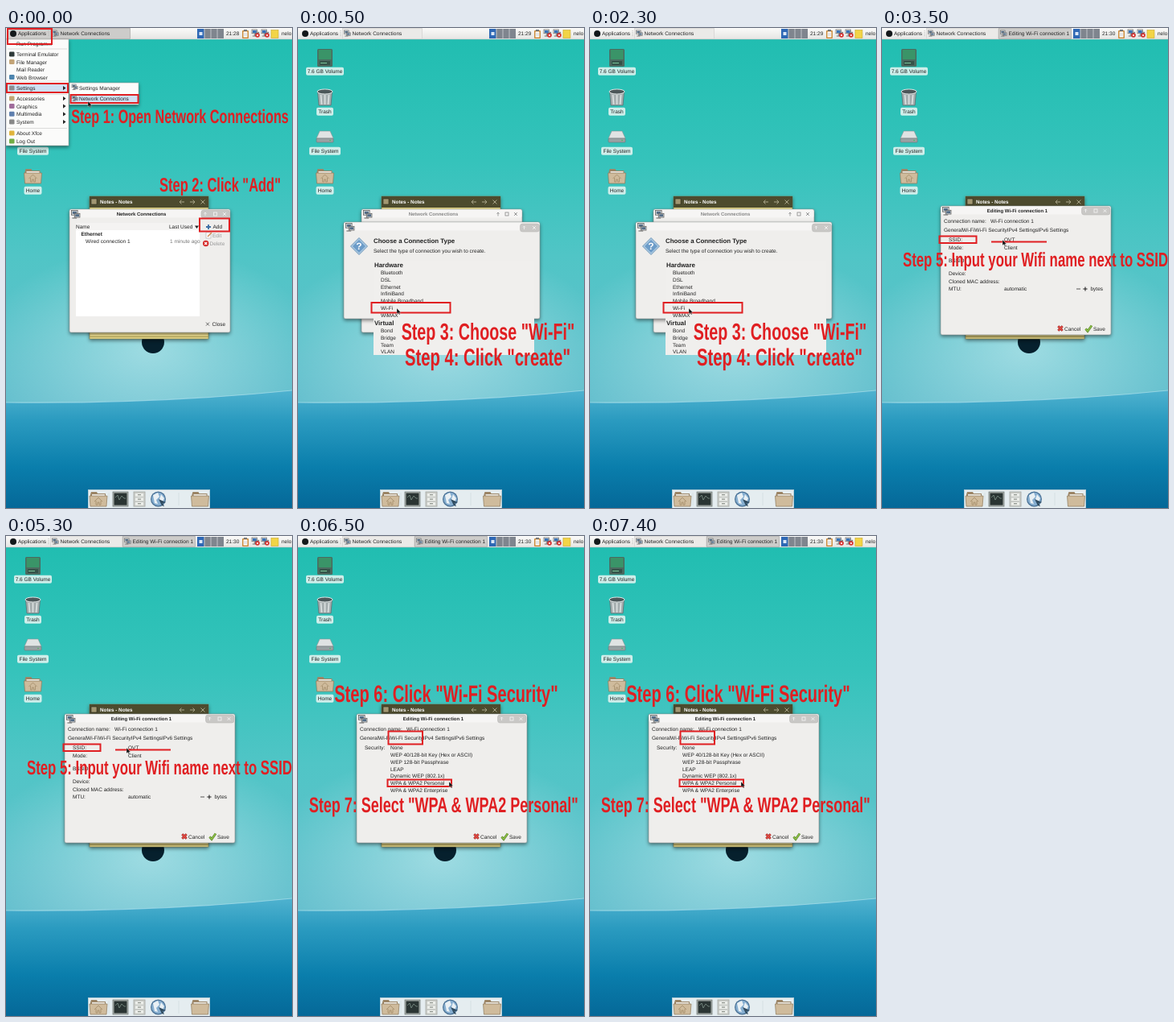
Recreate the animation shown at these times as an HTML page. Size 356x596 px, loop 8 s.

```html
<!DOCTYPE html>
<html lang="en">
<head>
<meta charset="utf-8">
<title>Wi-Fi setup steps</title>
<style>
html, body { margin: 0; width: 100%; height: 100%; overflow: hidden; }
svg { display: block; width: 356px; height: 596px; }
text { font-family: "Liberation Sans", Arial, sans-serif; text-rendering: geometricPrecision; white-space: pre; }
.shadow { filter: drop-shadow(0 2px 2px #0007); }
</style>
</head>
<body>
<svg id="stage" viewBox="0 0 356 596">
  <defs>
    <linearGradient id="sky" x2="0" y2="1">
      <stop stop-color="#1fbdb0"/><stop offset=".35" stop-color="#35c3bb"/>
      <stop offset=".6" stop-color="#50c5c6"/><stop offset="1" stop-color="#66bfce"/>
    </linearGradient>
    <radialGradient id="glow">
      <stop stop-color="#d3f1f5" stop-opacity=".55"/><stop offset="1" stop-color="#d3f1f5" stop-opacity="0"/>
    </radialGradient>
    <linearGradient id="sea" x2="0" y2="1">
      <stop stop-color="#4fb2cf"/><stop offset=".25" stop-color="#2b9bc0"/>
      <stop offset=".65" stop-color="#0a7eac"/><stop offset="1" stop-color="#056898"/>
    </linearGradient>
    <linearGradient id="bar" x2="0" y2="1">
      <stop stop-color="#fafaf9"/><stop offset="1" stop-color="#e6e5e3"/>
    </linearGradient>
  </defs>
  <rect width="356" height="470" fill="url(#sky)"/>
  <ellipse cx="178" cy="400" rx="210" ry="130" fill="url(#glow)"/>
  <path d="M0 465Q190 467 356 450V596H0Z" fill="url(#sea)"/>
  <path d="M0 465Q190 467 356 450" fill="none" stroke="#b9e6f0" stroke-width="1.2" opacity=".6"/>
  <circle cx="183" cy="390" r="14" fill="#06202d"/>
  <g id="scene"></g>
</svg>
<script>
const RED = '#e01f22', INK = '#222', FACE = '#efeeec';

const box = (x, y, w, h, fill, extra = '') =>
  `<rect x="${x}" y="${y}" width="${w}" height="${h}" fill="${fill}" ${extra}/>`;
const line = (d, color, width = 1, extra = '') =>
  `<path d="${d}" fill="none" stroke="${color}" stroke-width="${width}" ${extra}/>`;
const shape = (d, fill, extra = '') => `<path d="${d}" fill="${fill}" ${extra}/>`;
const disc = (x, y, r, fill) => `<circle cx="${x}" cy="${y}" r="${r}" fill="${fill}"/>`;
const at = (x, y, content) => `<g transform="translate(${x} ${y})">${content}</g>`;
const escapeText = s => s.replace(/&/g, '&amp;');

function text(x, y, s, { size = 6.5, bold, color = INK, mid } = {}) {
  return `<text x="${x}" y="${y}" font-size="${size}" fill="${color}"` +
    `${bold ? ' font-weight="700"' : ''}${mid ? ' text-anchor="middle"' : ''}>${escapeText(s)}</text>`;
}
const rows = (x, items) => items.map(([y, s]) => text(x, y, s)).join('');

// Headline in a condensed face
const step = (x, y, size, s) =>
  `<g transform="translate(${x} ${y}) scale(.68 1)">${text(0, 0, s, { size, bold: true, color: RED, mid: true })}</g>`;
const frame = (x, y, w, h) => box(x, y, w, h, 'none', `stroke="${RED}" stroke-width="2"`);
const cursor = (x, y) => at(x, y, shape('M0-3V4L1.6 2.6 3 5 4 4.4 2.8 2.2H5Z', '#111', 'stroke="#fff" stroke-width=".3"'));
const cross = (x, y, r, color, width = 1) =>
  line(`M${x - r} ${y - r}l${2 * r} ${2 * r}M${x + r} ${y - r}l${-2 * r} ${2 * r}`, color, width);
const plus = (x, y, r, color, width) => line(`M${x - r} ${y}h${2 * r}M${x} ${y - r}v${2 * r}`, color, width);

const folder = (x, y) => at(x, y,
  shape('M-10-6L-9-9H-2L-1-7H9V-4H-10Z', '#9c8566') +
  box(-8, -6, 16, 6, '#f0eee8') +
  shape('M-11-4H11L10 9H-10Z', '#cfbb9c', 'stroke="#8d7758" stroke-width=".7"'));
const house = (x, y) => at(x, y, line('M-5 1L0-4 5 1M-3 0V5H-1V2H1V5H3V0', '#a38c69', .8));
const netIcon = (x, y, k = 1) => `<g transform="translate(${x} ${y}) scale(${k})">` +
  box(0, 0, 8, 6, '#e3e5e5', 'stroke="#555" stroke-width=".8"') + box(1.3, 1.3, 5.4, 3.3, '#536c86') +
  box(4, 4, 7, 5, '#e3e5e5', 'stroke="#555" stroke-width=".8"') + box(5, 5, 5, 3, '#536c86') +
  line('M1 10H7', '#555') + '</g>';

function label(y, s, width) {
  return box(33.5 - width / 2, y - 7.2, width, 10, '#dff3f0', 'rx="2" opacity=".9"') +
    text(33.5, y, s, { mid: true });
}

function desktop() {
  const drive = box(24, 26, 19, 22, '#4b6a60', 'rx="1.5"') + box(25.5, 27, 16, 12, '#3a9468') +
    box(27, 41, 13, 5, '#355248') + box(28, 43, 8, 1, '#79c69a');
  const trash = shape('M24.5 79H42.5L41 96H26Z', '#a4adae', 'stroke="#5b6567" stroke-width=".7"') +
    line('M28.5 83L29.5 95M33.5 83V95M38.5 83L37.5 95', '#d9dfdf', 1.8) +
    '<ellipse cx="33.5" cy="79" rx="9.5" ry="3" fill="#4c5759" stroke="#dfe5e5"/>';
  const disk = shape('M27 128H40L44 137H23Z', '#e0e3e3', 'stroke="#8a9294" stroke-width=".6"') +
    box(23, 137, 21, 5, '#9aa1a3', 'rx="1" stroke="#6e7678" stroke-width=".6"') + disc(40, 139.5, .8, '#4b5');
  return drive + label(56, '7.6 GB Volume', 47) + trash + label(106, 'Trash', 21) +
    disk + label(155, 'File System', 39) + folder(33.5, 184) + house(33.5, 186) + label(204, 'Home', 22);
}

function dock() {
  const globe = disc(189.5, 585, 9.5, '#486f93') + disc(189.5, 585, 8.3, '#86aed0') +
    shape('M183 580L189 577 191 582 187 586 189 591 185 590ZM193 579L197 584 194 590 191 585Z', '#e9f0f4') +
    shape('M190 585L199 589 195 590 197 594 194 593Z', '#314c60');
  const cabinet = box(159, 576, 14, 18, '#d4d6d2', 'stroke="#a0a49f" stroke-width=".8"') +
    [577.5, 583, 588.5].map(y => box(160.5, y, 11, 4.5, '#eceeea', 'stroke="#b4b8b3" stroke-width=".5"') +
      box(164, y + 1.5, 4, 1.2, '#8c918b')).join('');
  const terminal = box(133, 576, 19, 18, '#aeb4b1', 'stroke="#68706d" stroke-width=".7"') +
    box(134.5, 577.5, 16, 15, '#2a3433') + line('M136 583L139 580 141 586 144 581 147 584H149', '#7f9389', .8);
  return box(102.5, 573.5, 151, 24, '#e5edf0', 'stroke="#b9d0d8"') +
    folder(115, 585) + house(115, 587) + terminal + cabinet + globe +
    line('M128 577V593M215 577V593', '#d2dde0', .8) + folder(241.5, 585);
}

function panel(clock, pressedMenu, tasks) {
  const task = ([x, w, s, active]) =>
    box(x + .5, .5, w - 1, 13, active ? '#cdccca' : '#ebeae8', `stroke="${active ? '#aaa9a7' : '#d2d1cf'}" stroke-width=".7"`) +
    netIcon(x + 2.5, 3, .7) + text(x + 12.5, 9.3, s);
  const pager = box(238, 1, 33, 12, '#7f858e') + box(238, 1, 8.5, 12, '#2e68b5') +
    box(240.5, 5, 4, 4, '#dce8f7') + line('M247 1V13M255 1V13M263 1V13', '#dfe1e4', .7);
  const clipboard = box(294, 3, 8, 10, '#cd8c3d', 'rx="1"') + box(295.5, 4.5, 5, 7, '#fff') +
    box(296, 2, 4, 2, '#777') + line('M296 7H300M296 9H300', '#aaa', .6);
  const offline = x => netIcon(x, 2, .8) + box(x + 1, 3, 4.5, 3, '#3973b8') +
    disc(x + 7, 9, 2.8, '#d8312e') + cross(x + 7, 9, 1, '#fff', .8);
  return box(0, 0, 356, 14, 'url(#bar)') + line('M0 14H356', '#a9b7b5', .5) +
    (pressedMenu ? box(1, 0, 54, 14, '#d0cfcd') : '') +
    disc(9, 7, 4, '#14191b') + text(15, 9.3, 'Applications') + line('M53 3V11', '#aaa', .8, 'stroke-dasharray="1 1"') +
    tasks.map(task).join('') + pager + text(274, 9.3, clock) + clipboard + offline(306) + offline(318) +
    box(330, 2.5, 9, 10, '#f2d447', 'stroke="#c8a92c" stroke-width=".6"') + text(343, 9.3, 'nelo');
}

const notes = () =>
  `<g class="shadow">${box(104, 209, 148, 177, '#eadb8d', 'stroke="#7e7848" stroke-width=".6"')}</g>` +
  line('M104 383.5H252', '#a89a52') + box(104, 209, 148, 14, '#4d4b2e') +
  box(106, 212, 7, 7, '#a29772', 'stroke="#29281a" stroke-width=".6"') +
  text(117, 218.3, 'Notes - Notes', { bold: true, color: '#fff', size: 6.3 }) +
  line('M222 216H216L218.5 213.5M216 216L218.5 218.5M229 216H235L232.5 213.5M235 216L232.5 218.5', '#aaa68a') +
  cross(245, 216, 2.5, '#aaa68a');

const frameWindow = (x, y, w, h, title = '', color = INK) =>
  `<g class="shadow">${box(x, y, w, h, FACE, 'rx="2" stroke="#8f9694" stroke-width=".6"')}</g>` +
  box(x + .5, y + .5, w - 1, 10, '#f6f5f4', 'rx="2"') + netIcon(x + 2.5, y + 1.5, .95) +
  text(168.5, y + 8.3, title, { bold: true, mid: true, color, size: 6 });

const titleButtons = (x, y, count) =>
  box(x, y - 5, count * 11.5 + 1, 10, '#c9c8c6', 'rx="3" stroke="#b2b1af" stroke-width=".5"') +
  line(`M${x + 5} ${y + 2}V${y - 2}l-1.5 1.5M${x + 5} ${y - 2}l1.5 1.5`, '#f5f5f5', .8) +
  (count > 2 ? box(x + 15.5, y - 2, 4, 4, 'none', 'stroke="#f5f5f5" stroke-width=".8"') : '') +
  cross(x + count * 11.5 - 5.5, y, 1.8, '#f5f5f5', .9);

function connections(active) {
  const head = frameWindow(79, 225, 200, 153, 'Network Connections', active ? INK : '#888');
  if (!active) {
    return head + line('M249 233.5V229L247.5 230.7M249 229L250.5 230.7', '#888', .8) +
      box(258, 229, 4, 4, 'none', 'stroke="#888" stroke-width=".8"') + cross(271, 231, 1.9, '#888', .9);
  }
  const grey = { color: '#999' };
  return head + titleButtons(243, 231, 3) +
    box(87, 242, 154, 116, '#fff') + box(87, 242, 154, 9, '#f4f3f2') +
    text(87, 249, 'Name') + text(203, 249, 'Last Used') + shape('M235 245.5H240L237.5 249Z', INK) +
    text(93.5, 257.5, 'Ethernet', { bold: true }) + text(99, 266.8, 'Wired connection 1') +
    text(204, 266.8, '1 minute ago', { color: '#777' }) +
    plus(252, 247, 3, '#3b6ea5', 1.8) + text(257.5, 249.4, 'Add') +
    box(249, 254, 6, 7, '#fff', 'stroke="#aaa" stroke-width=".6"') + line('M251 259L256 254', '#d08a55', 1.4) +
    text(257, 259.6, 'Edit', grey) + disc(248.7, 267.5, 3.7, '#d52b2b') + cross(248.7, 267.5, 1.5, '#fff', 1.1) +
    text(253.5, 270, 'Delete', grey) + cross(251, 367.6, 2, '#555', .9) + text(256.5, 370, 'Close');
}

function menu() {
  const edge = 'stroke="#a9a8a6" stroke-width=".6"';
  const highlight = '#cfe0f3';
  const items = [[22, 'Run Program...'], [35, 'Terminal Emulator'], [44.5, 'File Manager'], [54, 'Mail Reader'],
    [63.5, 'Web Browser'], [77, 'Settings'], [90, 'Accessories'], [99.5, 'Graphics'], [109.3, 'Multimedia'],
    [119, 'System'], [133, 'About Xfce'], [143, 'Log Out']];
  const tints = [null, '#2d3938', '#c3a477', null, '#4c84ae', '#8b8f93', '#c1a675', '#a06c9b', '#5f7fae', '#888', '#e0b43c', '#72ad45'];
  const icons = items.map(([y], i) => tints[i] ? box(4, y - 5.5, 6.5, 6, tints[i], 'rx="1.2"') : '').join('');
  const arrows = [77, 90, 99.5, 109.3, 119].map(y => shape(`M71 ${y - 5}L74.5 ${y - 2.4} 71 ${y + .2}Z`, INK)).join('');
  return `<g class="shadow">${box(0, 14, 78, 132, '#fbfbfa', edge) + box(79, 68, 86, 27, '#fbfbfa', edge)}</g>` +
    box(1, 69, 76, 11, highlight) + box(80, 83, 84, 10, highlight) +
    line('M2 26H76M2 66H76M2 82.5H76M2 124.5H76', '#d0cfcd', .7) + icons + arrows + rows(13, items) +
    netIcon(82, 70, .65) + netIcon(82, 84, .65) + text(91, 76.7, 'Settings Manager') + text(91, 90, 'Network Connections');
}

function chooser() {
  const kinds = ['Bluetooth', 'DSL', 'Ethernet', 'InfiniBand', 'Mobile Broadband', 'Wi-Fi', 'WiMAX'];
  const virtual = ['Bond', 'Bridge', 'Team', 'VLAN'];
  const heading = { bold: true, size: 7.9 };
  return frameWindow(57, 241, 244, 120) + titleButtons(276.5, 248, 2) + box(94, 289, 200, 117, '#f0efed') +
    at(76, 271, shape('M0-10.5L10.5 0 0 10.5-10.5 0Z', '#a9c8e2', 'stroke="#6f97b8"') +
      shape('M0-8L8 0 0 8-8 0Z', '#6c9cc8') + text(0, 4.2, '?', { bold: true, size: 12, color: '#fff', mid: true })) +
    text(94, 267, 'Choose a Connection Type', heading) +
    text(94, 279, 'Select the type of connection you wish to create.') +
    text(95, 297, 'Hardware', heading) + rows(103, kinds.map((s, i) => [305.7 + i * 8.9, s])) +
    text(95, 369, 'Virtual', heading) + rows(103, virtual.map((s, i) => [378 + i * 8.8, s]));
}

const editor = content =>
  frameWindow(73, 221, 212, 160, 'Editing Wi-Fi connection 1') + titleButtons(248.5, 227, 3) +
  text(77, 242.3, 'Connection name:') + text(135, 242.3, 'Wi-Fi connection 1') +
  text(77, 253, 'GeneralWi-FiWi-Fi SecurityIPv4 SettingsIPv6 Settings') + content +
  cross(222, 373, 2.7, '#8f1c1c', 2.8) + cross(222, 373, 2.6, '#e34b43', 1.7) + text(227, 375.8, 'Cancel') +
  line('M253.5 373.5L256 376.5 261 369.5', '#517d26', 2.8) + line('M253.5 373.5L256 376.5 261 369.5', '#8fc147', 1.5) +
  text(263, 375.8, 'Save');

const networkTask = active => [55, 100, 'Network Connections', active];
const editTasks = [[55, 90, 'Network Connections'], [145, 91, 'Editing Wi-Fi connection 1', true]];

const wifiFields = rows(83, [[265, 'SSID:'], [275, 'Mode:'], [291, 'BSSID:'], [307, 'Device:'],
  [316.5, 'Cloned MAC address:'], [326, 'MTU:']]) +
  rows(152, [[265, 'QVT'], [275, 'Client'], [326, 'automatic']]) +
  line('M242 324H247', '#444', .9) + plus(253, 324, 2.6, '#222', 1.1) + text(259.5, 326, 'bytes');
const securityFields = text(83, 265, 'Security:') + rows(115, ['None', 'WEP 40/128-bit Key (Hex or ASCII)',
  'WEP 128-bit Passphrase', 'LEAP', 'Dynamic WEP (802.1x)', 'WPA & WPA2 Personal', 'WPA & WPA2 Enterprise']
  .map((s, i) => [265 + i * 8.85, s]));

const scenes = [
  [0, desktop() + dock() + panel('21:28', true, [networkTask(true)]) + notes() + connections(true) + menu() +
    frame(2, 1, 55, 19) + frame(1, 69, 76, 11) + frame(80.5, 83, 84, 10) + frame(241, 236.5, 37, 16) + cursor(102, 94) +
    step(216.5, 117.5, 23.8, 'Step 1: Open Network Connections') + step(266.5, 203, 24.2, 'Step 2: Click "Add"')],
  [500, desktop() + dock() + panel('21:29', false, [networkTask(false)]) + notes() + connections(false) + chooser() +
    frame(91.5, 341, 98, 12.5) + cursor(123, 351) +
    step(236.5, 387, 29, 'Step 3: Choose "Wi-Fi"') + step(236, 419, 29.8, 'Step 4: Click "create"')],
  [3500, desktop() + dock() + panel('21:30', false, editTasks) + notes() + editor(wifiFields) +
    frame(71.5, 258.5, 46, 8.5) + line('M136 265.5H205', RED, 2) + cursor(150, 266) +
    step(191, 296, 24.7, 'Step 5: Input your Wifi name next to SSID')],
  [6500, desktop() + dock() + panel('21:30', false, editTasks) + notes() + editor(securityFields) +
    frame(112.5, 242.5, 42.5, 16) + frame(111.5, 302.5, 79.5, 8.5) + cursor(188, 308) +
    step(184.5, 206, 29.5, 'Step 6: Click "Wi-Fi Security"') +
    step(181.3, 343, 26.5, 'Step 7: Select "WPA & WPA2 Personal"')]
];

const layer = document.getElementById('scene');
let shown = null;
function tick() {
  const t = performance.now() % 8000;
  const current = scenes.findLast(([start]) => t >= start);
  if (current !== shown) {
    layer.innerHTML = current[1];
    shown = current;
  }
  requestAnimationFrame(tick);
}
tick();
</script>
</body>
</html>
```
